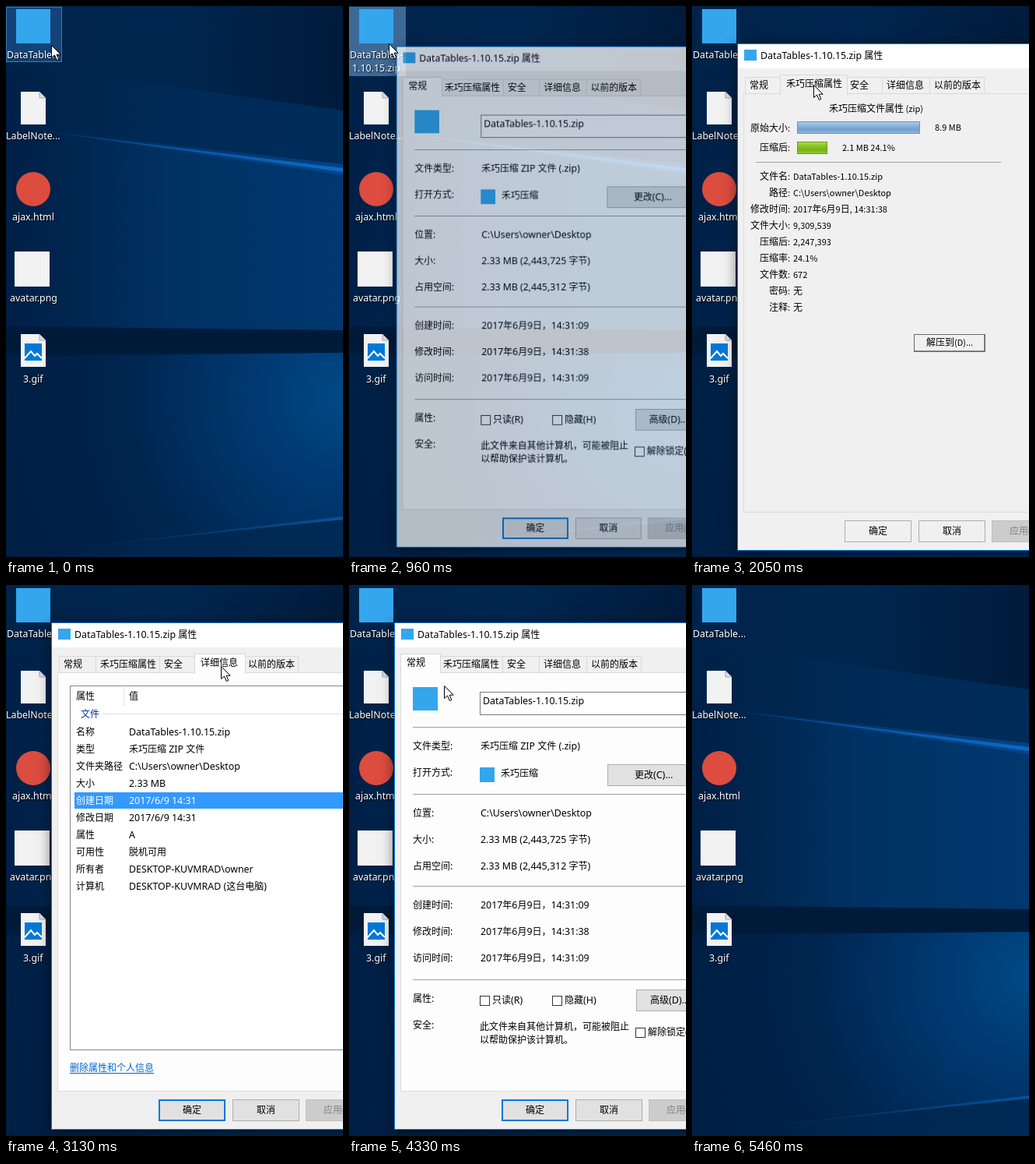
These frames come from a looping animation (433 px wide and 707 px high, 6.08 s). An HTML page with a canvas:

```html
<!DOCTYPE html>
<html lang="zh-CN">
<head>
<meta charset="utf-8">
<title>文件属性</title>
<style>
html, body { margin: 0; width: 100%; height: 100%; overflow: hidden; background: #00244b; }
canvas { display: block; }
</style>
</head>
<body>
<canvas id="stage" width="433" height="707"></canvas>
<script>
const LOOP = 6080;
const BEAT = 136.5;   // the picture only changes on beats
const LEAD = 22;
const stage = document.getElementById('stage').getContext('2d');
const layer = document.createElement('canvas');
layer.width = 560;
layer.height = 760;
const dialogLayer = layer.getContext('2d');
let g = stage;

const FILE = 'DataTables-1.10.15.zip';
const APP = '禾巧压缩';
const FOLDER = 'C:\\Users\\owner\\Desktop';
const HOST = 'DESKTOP-KUVMRAD';
const BLUE = '#0078d7', APP_BLUE = '#34a6ee', RIGHT = 476;
const UI_FONT = '12.4px "Noto Sans", sans-serif';
const COMPACT_FONT = '11px "Noto Sans CJK SC", sans-serif';
const CJK_FONT = '12px "Noto Sans CJK SC", sans-serif';

// Beats of the main events
const SELECT = 5, OPEN = 6, DEACTIVATE = 37, CLOSED = 39, CURSOR_OFF = 40;
const PAGE_TURNS = [14, 19, 23, 27, 30];

// Cursor key points: beat, x, y
const PATH = [
  [0, 58, 50], [3, 51, 48], [8, 51, 48], [9, 179, 166], [10, 219, 198], [12, 166, 127],
  [15, 156, 101], [19, 228, 103], [20, 266, 103], [23, 276, 104], [26, 334, 104], [27, 334, 104],
  [29, 92, 103], [30, 92, 103], [32, 152, 154], [33, 322, 627], [35, 342, 664], [37, 342, 664],
  [39, 325, 646]
];

function cursorAt(beat) {
  const next = PATH.findIndex(p => p[0] > beat);
  if (next < 0) return PATH[PATH.length - 1].slice(1);
  const [b0, x0, y0] = PATH[next - 1], [b1, x1, y1] = PATH[next];
  const p = (beat - b0) / (b1 - b0);
  return [Math.round(x0 + (x1 - x0) * p), Math.round(y0 + (y1 - y0) * p)];
}

function sceneAt(t) {
  const beat = Math.floor((t + LEAD) / BEAT);
  const [x, y] = cursorAt(beat);
  const shown = Math.min((beat - OPEN + 1) / 3, (CLOSED - beat) / 2, 1);
  return {
    beat, x, y,
    page: PAGE_TURNS.filter(b => b <= beat).length % PAGE_TURNS.length,
    opacity: shown > 0 ? shown ** .7 : 0,
    over: (left, top, w, h) => x >= left && x < left + w && y >= top && y < top + h
  };
}

function box(x, y, w, h, fill, border) {
  if (fill) { g.fillStyle = fill; g.fillRect(x, y, w, h); }
  if (border) {
    g.strokeStyle = border;
    g.lineWidth = 1;
    g.strokeRect(x + .5, y + .5, w - 1, h - 1);
  }
}
const rule = (x, y, w, color) => box(x, y, w, 1, color);
const post = (x, y, h, color) => box(x, y, 1, h, color);

function trace(points) {
  g.beginPath();
  points.forEach(([x, y]) => g.lineTo(x, y));
}
function shape(points, fill, stroke) {
  trace(points);
  g.closePath();
  g.fillStyle = fill;
  g.fill();
  if (stroke) { g.strokeStyle = stroke; g.lineWidth = 1; g.stroke(); }
}
function line(points, color, width = 1) {
  trace(points);
  g.strokeStyle = color;
  g.lineWidth = width;
  g.stroke();
}
function disc(x, y, r, fill) {
  g.beginPath();
  g.arc(x, y, r, 0, 7);
  g.fillStyle = fill;
  g.fill();
}

// Latin and Chinese runs use different fonts; y is the middle of the line.
function text(str, x, y, color = '#000', align = 0, latin = UI_FONT) {
  const runs = str.match(/[\x00-\x7f]+|[^\x00-\x7f]+/g).map(s => {
    const font = g.font = s.charCodeAt(0) < 128 ? latin : CJK_FONT;
    return { s, font, w: g.measureText(s).width };
  });
  const width = runs.reduce((sum, r) => sum + r.w, 0);
  x = Math.round(x - width * align);
  g.fillStyle = color;
  for (const r of runs) {
    g.font = r.font;
    g.fillText(r.s, x, y + 4);
    x += r.w;
  }
  return width;
}

function fillStops(grad, colors) {
  colors.forEach((c, i) => grad.addColorStop(i / (colors.length - 1), c));
  return grad;
}
const across = (...colors) => fillStops(g.createLinearGradient(0, 0, 433, 0), colors);
const down = (y, h, ...colors) => fillStops(g.createLinearGradient(0, y, 0, y + h), colors);

function wallpaper() {
  box(0, 0, 433, 707, across('#00234a', '#00264f', '#001b3b'));
  shape([[60, 82], [433, 134], [433, 212], [0, 155], [0, 82]], across('#002147', '#002a56', '#002c5a'));
  box(0, 408, 433, 42, down(408, 42, '#001c3c', '#001936', '#001c3c'));
  shape([[0, 155], [433, 212], [433, 416], [0, 411]],
    across('#001f46', '#002852', '#003264', '#003569', '#00386f'));
  const glow = g.createRadialGradient(433, 500, 10, 433, 500, 440);
  shape([[0, 449], [433, 445], [433, 707], [0, 707]],
    fillStops(glow, ['#004885', '#003b74', '#003164', '#002650', '#002148', '#001f45']));
  shape([[433, 657], [433, 707], [0, 707], [0, 704]], across('#001d40', '#002650', '#002a55'));
  shape([[433, 655], [433, 659], [60, 698]], across('#00376a00', '#0a5199'));
  shape([[30, 158], [433, 203], [433, 217]], across('#08509c00', '#08509c99'));
  shape([[50, 161], [433, 208], [433, 213]], across('#0a4f9a44', '#0a56a8', '#0f68c4'));
}

function paper(y) {
  shape([[19, y], [43, y], [51, y + 8], [51, y + 42], [19, y + 42]], '#f2f2f2');
  shape([[43, y], [51, y + 8], [43, y + 8]], '#d6dde4', '#9fabb8');
}

function label(str, y) {
  g.save();
  g.shadowColor = '#000';
  g.shadowBlur = 2;
  g.shadowOffsetX = g.shadowOffsetY = 1;
  text(str, 35, y, '#fff', .5);
  g.restore();
}

function desktop({ beat }) {
  wallpaper();
  const selected = beat >= SELECT && beat < PAGE_TURNS[0];
  if (selected) box(0, 1, 73, 89, 'rgba(125,175,225,.5)');
  else if (beat < SELECT) box(0, 1, 72, 71, 'rgba(50,120,190,.38)', '#2f7cc0');
  box(13, 4, 44, 44, APP_BLUE);
  paper(110);
  disc(35, 235, 22, '#dc4c3f');
  box(11, 315, 45, 45, '#f2f2f2');
  paper(421);
  box(24, 433, 22, 22, BLUE);
  line([[24, 452], [32, 443], [37, 449], [40, 446], [46, 452]], '#fff', 2);
  if (selected) ['DataTables-', '1.10.15.zip'].forEach((s, i) => label(s, 63 + 17 * i));
  else label('DataTable...', 63);
  ['LabelNote...', 'ajax.html', 'avatar.png', '3.gif'].forEach((s, i) => label(s, 167 + 104 * i));
}

let face = '#e1e1e1';
function button(str, x, y, w, state) {
  const [fill, border] = {
    off: ['#cccccc', '#bfbfbf'],
    hover: ['#e5f1fb', BLUE],
    pressed: ['#cce4f7', '#005499'],
    default: [face, BLUE]
  }[state] || [face, '#adadad'];
  box(x, y, w, 28, fill, border);
  if (state === 'default') box(x + 1, y + 1, w - 2, 26, null, BLUE);
  text(str, x + w / 2, y + 14, state === 'off' ? '#838383' : '#000', .5);
}

function checkbox(str, x, y) {
  box(x, y, 13, 13, '#fff', '#333');
  text(str, x + 16, y + 6);
}

function generalPage({ over }) {
  box(82, 131, 32, 30, APP_BLUE);
  box(168, 137, RIGHT - 168, 30, '#fff', over(168, 137, 300, 28) ? '#171717' : '#7a7a7a');
  text(FILE, 172, 149);
  const group = (top, rows) => {
    rule(82, top - 25, RIGHT - 82, '#a0a0a0');
    rows.forEach(([name, value], i) => {
      text(name, 82, top + i * 34);
      if (value) text(value, 169, top + i * 34);
    });
  };
  group(207, [['文件类型:', APP + ' ZIP 文件 (.zip)'], ['打开方式:']]);
  group(293, [
    ['位置:', FOLDER],
    ['大小:', '2.33 MB (2,443,725 字节)'],
    ['占用空间:', '2.33 MB (2,445,312 字节)']
  ]);
  group(411, [
    ['创建时间:', '2017年6月9日，14:31:09'],
    ['修改时间:', '2017年6月9日，14:31:38'],
    ['访问时间:', '2017年6月9日，14:31:09']
  ]);
  group(531, [['属性:'], ['安全:']]);
  box(168, 234, 19, 19, APP_BLUE);
  text(APP, 195, 242);
  button('更改(C)...', 332, 230, 120);
  checkbox('只读(R)', 168, 527);
  checkbox('隐藏(H)', 261, 527);
  button('高级(D)...', 369, 519, 86);
  text('此文件来自其他计算机，可能被阻止', 168, 567);
  text('以帮助保护该计算机。', 168, 584);
  checkbox('解除锁定(K)', 368, 568);
}

function archivePage() {
  const put = (s, x, y, align) => text(s, x, y, '#000', align, COMPACT_FONT);
  put(APP + '文件属性 (zip)', 236, 132, .5);
  put('原始大小:', 126, 157, 1);
  put('压缩后:', 126, 182, 1);
  box(135, 148, 158, 16, down(148, 16, '#b4d0ea', '#8fb5db', '#6f9fcd', '#9cc0e2'), '#6b93bb');
  box(135, 174, 39, 16, down(174, 16, '#b4dd62', '#8cc627', '#74b211', '#98cf3c'), '#6b9a1c');
  put('8.9 MB', 312, 156);
  put('2.1 MB 24.1%', 193, 182);
  rule(82, 200, 315, '#a0a0a0');
  [
    ['文件名:', FILE],
    ['路径:', FOLDER],
    ['修改时间:', '2017年6月9日, 14:31:38'],
    ['文件大小:', '9,309,539'],
    ['压缩后:', '2,247,393'],
    ['压缩率:', '24.1%'],
    ['文件数:', '672'],
    ['密码:', '无'],
    ['注释:', '无']
  ].forEach(([name, value], i) => {
    const y = 219 + i * 21;
    put(name, 126, y, 1);
    put(value, 130, y);
  });
  box(285, 421, 92, 23, '#f0f0f0', '#696969');
  rule(286, 442, 90, '#8a8a8a');
  post(375, 422, 21, '#8a8a8a');
  put('解压到(D)...', 331, 432, .5);
}

function securityPage({ beat }) {
  text('对象名称:', 82, 136);
  text(FOLDER + '\\' + FILE, 150, 136);
  text('组或用户名(G):', 82, 166);
  box(82, 178, RIGHT - 82, 96, '#fff', '#828790');
  ['SYSTEM', `owner (${HOST}\\owner)`, 'Administrators'].forEach((s, i) => text(s, 108, 192 + i * 20));
  text('要更改权限，请单击“编辑”。', 82, 303);
  button('编辑(E)...', 376, 289, 100);
  text('SYSTEM 的权限(P)', 82, 346);
  text('允许', 340, 346);
  text('拒绝', 410, 346);
  box(82, 358, RIGHT - 82, 150, '#fff', '#828790');
  ['完全控制', '修改', '读取和执行', '读取', '写入', '特殊权限'].forEach((s, i) => {
    const y = 374 + i * 23;
    text(s, 90, y);
    if (beat > PAGE_TURNS[1] && i < 5) line([[347, y], [350, y + 3], [356, y - 4]], '#777', 1.5);
  });
  text('有关特殊权限或高级设置，请单击“高级”。', 82, 540);
  button('高级(V)', 376, 554, 100);
}

function detailsPage() {
  box(82, 129, RIGHT - 82, 468, '#fff', '#828790');
  text('属性', 90, 143);
  text('值', 158, 143);
  post(151, 131, 24, '#e2e2e2');
  text('文件', 96, 166, '#003399');
  rule(123, 165, RIGHT - 125, '#dfdfdf');
  [
    ['名称', FILE],
    ['类型', APP + ' ZIP 文件'],
    ['文件夹路径', FOLDER],
    ['大小', '2.33 MB'],
    ['创建日期', '2017/6/9 14:31'],
    ['修改日期', '2017/6/9 14:31'],
    ['属性', 'A'],
    ['可用性', '脱机可用'],
    ['所有者', HOST + '\\owner'],
    ['计算机', HOST + ' (这台电脑)']
  ].forEach(([name, value], i) => {
    const y = 189 + i * 22, active = name === '创建日期';
    const color = active ? '#fff' : '#000';
    if (active) box(88, y - 11, RIGHT - 90, 21, '#3399ff');
    text(name, 90, y, color);
    text(value, 158, y, color);
  });
  rule(82, 626, text('删除属性和个人信息', 82, 620, '#0066cc'), '#0066cc');
}

function versionsPage() {
  disc(103, 147, 13, '#9aa5ad');
  disc(103, 147, 11, '#e9eff3');
  line([[103, 138], [103, 147], [110, 147]], '#56636d', 1.3);
  g.beginPath();
  g.arc(104, 147, 12, Math.PI, Math.PI * 1.6);
  g.strokeStyle = '#4fae43';
  g.lineWidth = 5;
  g.stroke();
  shape([[84, 146], [100, 146], [92, 155]], '#4fae43');
  text('以前的版本来自文件历史记录或来自还原点。', 154, 140);
  text('文件夹版本(F):', 84, 220);
  box(84, 242, RIGHT - 84, 348, '#fff', '#6c6f74');
  text('名称', 102, 256, '#4c607a');
  text('修改日期', 200, 256, '#4c607a');
  post(193, 243, 27, '#e2e2e2');
  post(313, 243, 27, '#e2e2e2');
  line([[250, 244], [253.5, 247.5], [257, 244]], '#777');
  text('正在处理它...', 233, 294, '#6d6d6d');
  button('打开(O)', 270, 601, 70, 'off');
  box(339, 601, 17, 28, '#cccccc', '#bfbfbf');
  shape([[342, 612], [354, 612], [348, 618]], '#838383');
  button('还原(R)', 366, 601, 70, 'off');
}

const PAGES = [generalPage, archivePage, securityPage, detailsPage, versionsPage];
const TABS = ['常规', APP + '属性', '安全', '详细信息', '以前的版本'];
const TAB_EDGES = [68, 115, 197, 244, 305, 375];

function tab(i, selected, fill, over) {
  const x = TAB_EDGES[i], w = TAB_EDGES[i + 1] - x + 1;
  if (selected) {
    box(x - 2, 88, w + 4, 26, fill, '#d9d9d9');
    box(x - 1, 112, w + 2, 2, fill);
  } else box(x, 91, w, 22, over(x, 91, w, 22) ? '#d8eaf9' : '#f0f0f0', '#d9d9d9');
  text(TABS[i], x + 6, selected ? 100 : 102);
}

function dialog(scene) {
  const { beat, page, over } = scene;
  const closing = beat >= DEACTIVATE;
  const archive = page === 1;
  const fill = archive ? '#f0f0f0' : '#fdfdfd';
  face = archive ? '#f0f0f0' : closing ? '#fdfdfd' : '#e1e1e1';
  g.clearRect(0, 0, 560, 760);
  g.save();
  g.shadowColor = closing ? 'rgba(0,0,0,.25)' : 'rgba(0,0,0,.55)';
  g.shadowBlur = 16;
  g.shadowOffsetY = 3;
  box(58, 48, 435, 651, closing ? '#fdfdfd' : '#f0f0f0');
  g.restore();
  box(59, 49, 433, 31, '#fff');
  box(58, 48, 435, 651, null, closing ? '#9aa7b4' : BLUE);
  box(67, 56, 16, 14, APP_BLUE);
  text(FILE + ' 属性', 88, 64, closing ? '#8c8c8c' : '#000');
  box(66, 112, 419, 538, fill, '#dcdcdc');
  TABS.forEach((_, i) => { if (i !== page) tab(i, false, fill, over); });
  tab(page, true, fill, over);
  PAGES[page](scene);
  const overCancel = over(291, 660, 86, 28);
  button('确定', 196, 660, 86, archive || overCancel ? '' : 'default');
  button('取消', 291, 660, 86, overCancel ? (beat < DEACTIVATE - 1 ? 'hover' : 'pressed') : '');
  button('应用(A)', 385, 660, 86, 'off');
}

function cursor(x, y) {
  const outline = [[0, 0], [0, 16], [4, 12.5], [6.8, 19], [9.3, 18], [6.6, 11.7], [11.7, 11.7]];
  shape(outline.map(([dx, dy]) => [x + dx + .5, y + dy + .5]), '#fff', '#000');
}

function frame() {
  const scene = sceneAt(performance.now() % LOOP);
  g = stage;
  desktop(scene);
  if (scene.opacity) {
    g = dialogLayer;
    dialog(scene);
    g = stage;
    const scale = 1 - .048 * (1 - scene.opacity);
    g.save();
    g.globalAlpha = scene.opacity;
    g.translate(275, 350);
    g.scale(scale, scale);
    g.drawImage(layer, -275, -350);
    g.restore();
  }
  if (scene.beat < CURSOR_OFF) cursor(scene.x, scene.y);
  requestAnimationFrame(frame);
}
frame();
</script>
</body>
</html>
```
